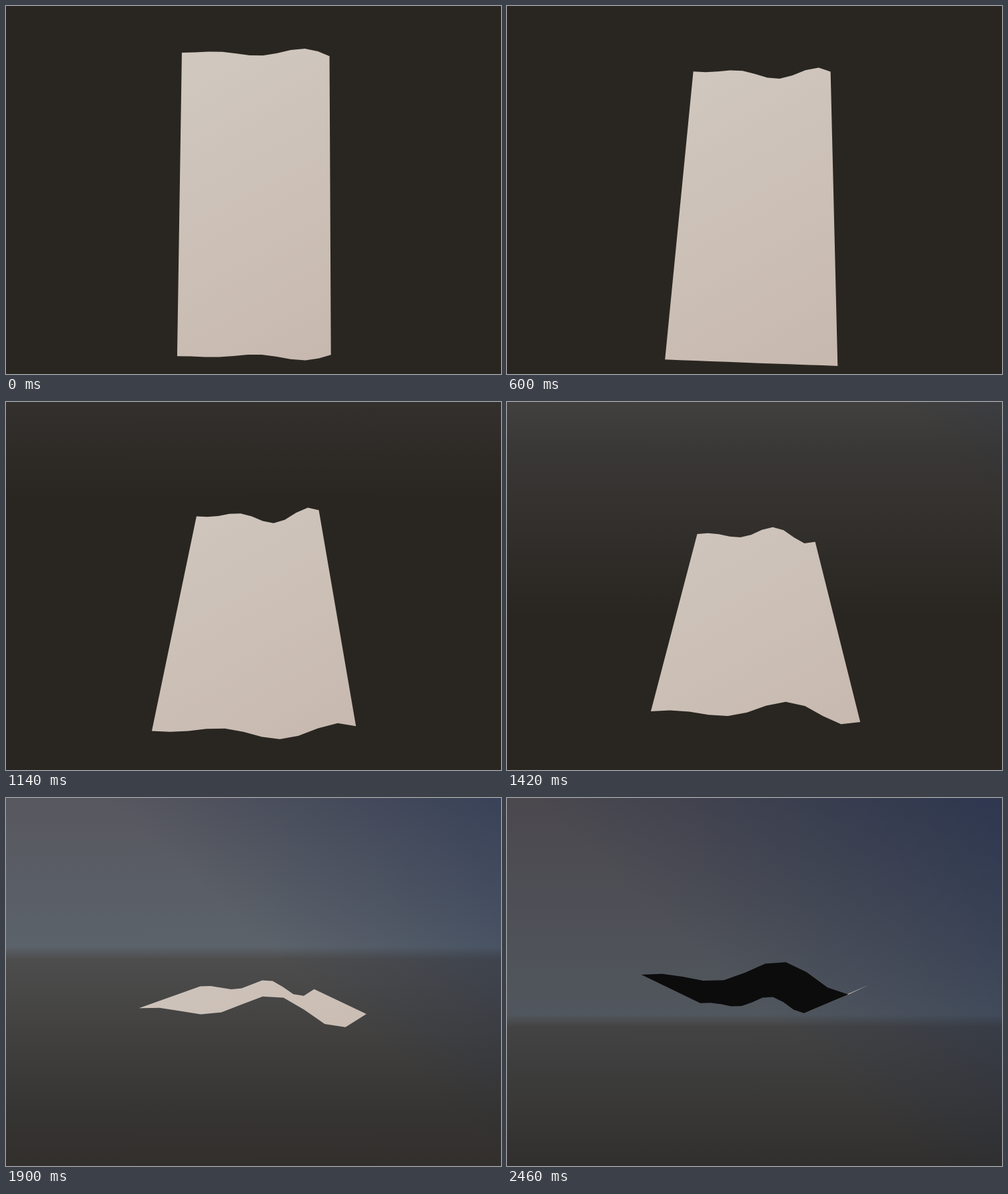
These frames come from a looping animation (743x552 px, 2530 ms). An HTML page with a canvas:

```html
<!DOCTYPE html>
<html lang="en">
<head>
<meta charset="utf-8">
<title>Waving sheet</title>
<style>
html, body { margin: 0; height: 100%; overflow: hidden; background: #292621; }
canvas { display: block; }
</style>
</head>
<body>
<canvas id="stage" width="743" height="552"></canvas>
<script>
const ctx = document.getElementById('stage').getContext('2d');
const WIDTH = 743, HEIGHT = 552, LOOP = 2530;
const FOCAL = 684, DISTANCE = 3, CENTER_X = 374.5, CENTER_Y = 293.5, STRIPS = 11;

// Hand-moved orbit: step, pitch, yaw in degrees
const ORBIT = [
  [0, 86.5, 0.3], [5, 80.3, 0], [8, 71, 2], [13, 66, 2.1], [16, 44, 1],
  [21, 32.5, 0], [26, 18.6, 0.9], [28, 3.7, 0.8], [32, -4.8, 0.4]
];

const radians = degrees => degrees * Math.PI / 180;

// About 15 pictures a second, slightly slower in the second half
function stepAt(ms) {
  const t = ms + 6;
  return Math.min(36, Math.floor(t < 1070 ? t / 66.75 : 16 + (t - 1070) / 69.5));
}

function orbitAt(step) {
  const s = Math.min(step, 32);
  const next = Math.max(1, ORBIT.findIndex(key => key[0] >= s));
  const a = ORBIT[next - 1], b = ORBIT[next];
  const k = (s - a[0]) / (b[0] - a[0]);
  return a.map((value, i) => value + (b[i] - value) * k);
}

function gradient(x0, y0, x1, y1, ...colors) {
  const g = ctx.createLinearGradient(x0, y0, x1, y1);
  colors.forEach((color, i) => g.addColorStop(i / (colors.length - 1), color));
  return g;
}

function drawBackdrop(pitch) {
  const horizon = HEIGHT / 2 - FOCAL * Math.tan(radians(pitch));
  const exposure = Math.min(1.05, 0.94 + 0.0145 * pitch);
  const lit = (...rgb) => `rgb(${rgb.map(c => Math.round(c * exposure))})`;
  const haze = lit(93, 100, 108), soil = lit(78, 78, 78);
  const fill = (style, top, bottom) => {
    ctx.fillStyle = style;
    ctx.fillRect(0, top, WIDTH, bottom - top);
  };

  fill(gradient(0, horizon, 0, horizon + 480, soil, lit(54, 52, 50), 'rgb(41,38,33)'), 0, HEIGHT);
  fill(gradient(0, horizon - 340, 0, horizon, lit(86, 83, 90), haze), 0, horizon);
  fill(gradient(0, horizon - 9, 0, horizon + 9, haze, soil), horizon - 9, horizon + 9);
  fill(gradient(400, horizon, 700, horizon - 330, 'rgba(20,40,80,0)', 'rgba(20,40,80,.5)'), 0, HEIGHT);
}

function drawSheet(step, pitch, yaw) {
  const sinP = Math.sin(pitch), cosP = Math.cos(pitch);
  const sinY = Math.sin(yaw), cosY = Math.cos(yaw);

  function project(i, v) {
    const u = i / STRIPS, x = u - 0.5;
    const lift = 0.098 * u * Math.sin(10.3 * (u - 0.6425 - 0.079 * step));
    const across = x * cosY - v * sinY, along = v * cosY + x * sinY;
    const scale = FOCAL / (DISTANCE - along * cosP - lift * sinP);
    return [CENTER_X + across * scale, CENTER_Y + (along * sinP - lift * cosP) * scale];
  }

  const front = new Path2D(), back = new Path2D();
  for (let i = 0; i < STRIPS; i++) {
    const quad = [project(i, -1), project(i + 1, -1), project(i + 1, 1), project(i, 1)];
    const [a, b, c, d] = quad;
    const area = (c[0] - a[0]) * (d[1] - b[1]) - (c[1] - a[1]) * (d[0] - b[0]);
    const side = area > 0 ? front : back;
    quad.forEach((point, n) => n ? side.lineTo(...point) : side.moveTo(...point));
    side.closePath();
  }
  ctx.fillStyle = gradient(230, 60, 500, 540, 'rgb(209,201,192)', 'rgb(199,184,175)');
  ctx.fill(front);
  ctx.fillStyle = 'rgb(12,12,13)';
  ctx.fill(back);
}

function draw(now) {
  const step = stepAt(now % LOOP);
  const [, pitch, yaw] = orbitAt(step);
  drawBackdrop(pitch);
  drawSheet(step, radians(pitch), radians(yaw));
}

let start;
function tick(now) {
  start ??= now;
  draw(Math.max(0, now - start));
  requestAnimationFrame(tick);
}
draw(0);
requestAnimationFrame(tick);
</script>
</body>
</html>
```
